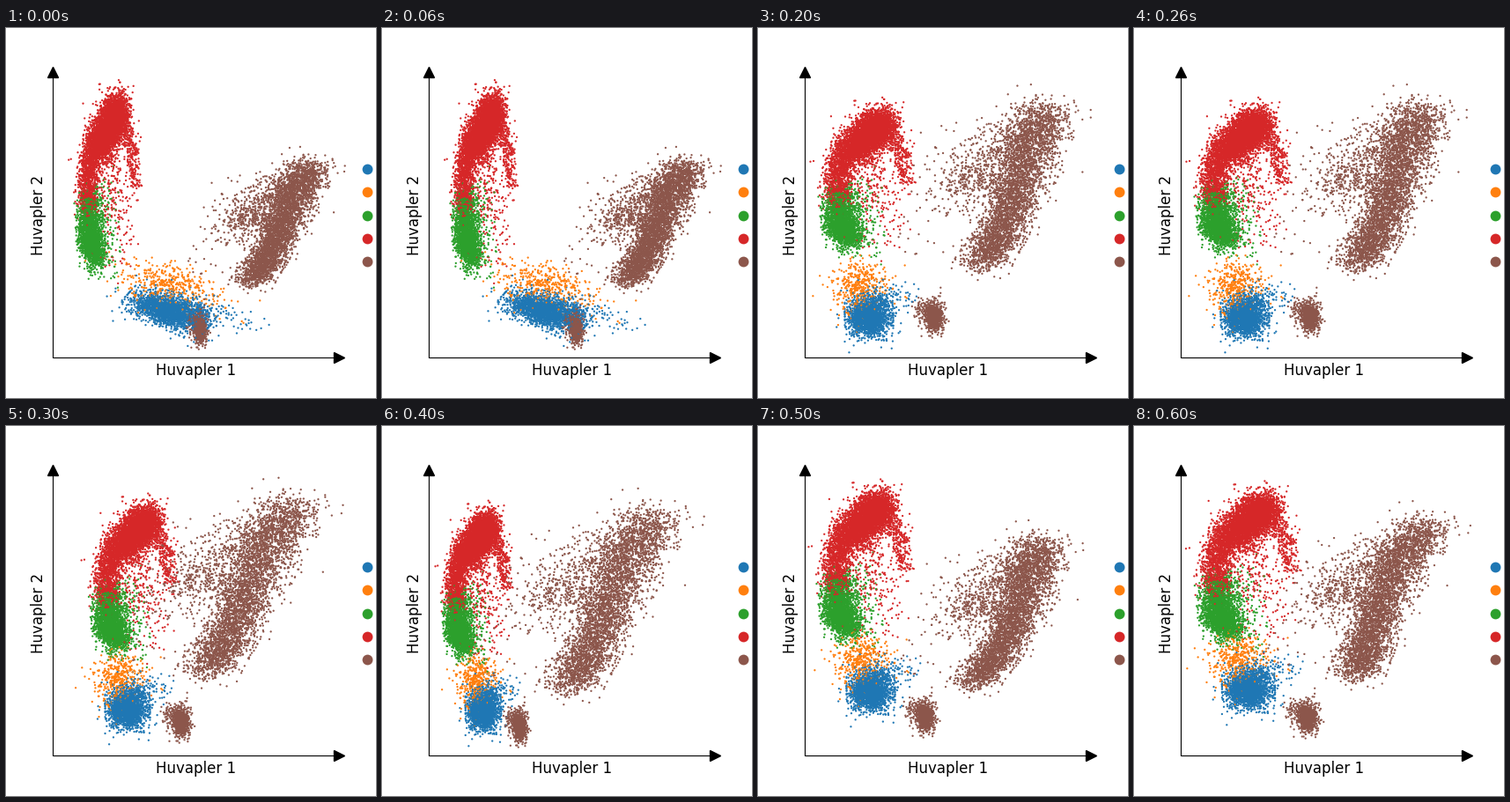
Recreate the animation shown at these times as a matplotlib script. Size 420x420 px, loop 0.7 s.

```python
import numpy as np
import matplotlib.pyplot as plt
from matplotlib.animation import FuncAnimation

SIZE, DPI = 420, 100
BLUE, ORANGE, GREEN, RED, BROWN = "#1f77b4", "#ff7f0e", "#2ca02c", "#d62728", "#8c564b"

# Key points per step: box of the arch (x, y, width, height), centres of the
# base and the island, top and foot of the large mass, and its bow.
ARCH = np.array([(82, 68, 66, 210), (74, 80, 113, 165), (75, 86, 95, 169),
                 (100, 84, 88, 176), (72, 92, 70, 173), (73, 68, 95, 178),
                 (76, 70, 104, 178)])
BASE = np.array([(184, 321), (130, 320), (126, 328), (138, 321),
                 (115, 323), (128, 301), (130, 299)])
ISLAND = np.array([(219, 338), (225, 314), (198, 325), (197, 333),
                   (155, 338), (188, 327), (195, 328)])
TOP = np.array([(340, 158), (328, 95), (320, 95), (318, 92),
                (300, 105), (315, 135), (325, 115)])
FOOT = np.array([(280, 286), (272, 250), (255, 266), (230, 276),
                 (214, 294), (246, 290), (253, 280)])
BOW = [.02, .15, .03, 0, 0, .07, -.05]
STEPS = len(BOW)
TILT = np.array([(1.7, .65), (-.6, .65)])  # the base lies slanted at first

rng = np.random.default_rng(12)


def on_arch(p, k):
    return ARCH[k, :2] + p * ARCH[k, 2:]


def width(k):
    return np.diag([ARCH[k, 2] / 95, 1])


def on_base(p, k):
    return BASE[k] + p @ (TILT if k == 0 else width(k))


def on_island(p, k):
    return ISLAND[k] + p @ width(k)


def on_mass(p, k):
    """First coordinate runs sideways, second from top to foot."""
    axis = FOOT[k] - TOP[k]
    a, b = p.T
    c = np.clip(b, 0, 1)
    side = (a + BOW[k] * 4 * c * (1 - c)) * np.hypot(*axis)
    return TOP[k] + np.outer(b, axis) + np.outer(side, (1, 0))


def cloud(n, start, mid, end, spread, skew=1.0, tail=.05):
    """Points strewn with normal noise along a curve through three points."""
    t = rng.random((n, 1)) ** skew
    spine = ((1 - t) * (1 - 2 * t) * np.array(start)
             + 4 * t * (1 - t) * np.array(mid)
             + t * (2 * t - 1) * np.array(end))
    noise = np.clip(rng.normal(size=(n, 2)), -2.5, 2.5)
    noise *= np.where(rng.random((n, 1)) < tail, 1.6, 1)
    return spine + noise * spread


GROUPS = [
    # red head, limb, arm and strays
    (RED, on_arch, cloud(3500, (.72, .13), (.56, .19), (.37, .31), (.10, .058))),
    (RED, on_arch, cloud(1500, (.34, .26), (.20, .43), (.16, .66), (.085, .05))),
    (RED, on_arch, cloud(260, (.80, .22), (.94, .36), (.95, .55), (.055, .04))),
    (RED, on_arch, cloud(260, (.50, .35), (.57, .58), (.65, .92), (.16, .08), 1.4)),
    # green body and strays
    (GREEN, on_arch, cloud(2300, (.21, .62), (.19, .79), (.33, .91), (.09, .045), .9)),
    (GREEN, on_arch, cloud(200, (.36, .56), (.40, .75), (.48, .92), (.13, .07))),
    # orange and blue base
    (ORANGE, on_base, cloud(430, (-6, -52), (-11, -32), (-15, -14), (13, 10), tail=.15)),
    (BLUE, on_base, cloud(2000, (0, -5), (0, 0), (0, 5), (11, 10))),
    (BLUE, on_base, cloud(120, (-5, -30), (18, -18), (40, -25), (10, 9))),
    # brown island
    (BROWN, on_island, cloud(800, (-18, -8), (0, 0), (4, 5), (4.5, 8), .55)),
    # brown mass: upper part, lower part, left fuzz, strays
    (BROWN, on_mass, cloud(1700, (.02, .02), (0, .23), (0, .48), (.095, .07))),
    (BROWN, on_mass, cloud(2100, (0, .45), (.02, .74), (0, 1), (.075, .045), .9)),
    (BROWN, on_mass, cloud(600, (-.1, .1), (-.22, .36), (-.40, .48), (.10, .10))),
    (BROWN, on_mass, cloud(50, (-.45, .1), (-.5, .45), (-.45, .85), (.12, .1))),
]

hues = np.concatenate([[color] * len(p) for color, _, p in GROUPS])
cells = np.array([np.concatenate([place(p, k) for _, place, p in GROUPS])
                  for k in range(STEPS)])
order = rng.permutation(len(hues))
hues, cells = hues[order], cells[:, order]

fig = plt.figure(figsize=(SIZE / DPI, SIZE / DPI), dpi=DPI, facecolor="white")
ax = fig.add_axes([0, 0, 1, 1])
ax.set(xlim=(0, SIZE), ylim=(SIZE, 0))
ax.axis("off")

dots = ax.scatter(*cells[0].T, s=2.7, c=hues, linewidths=0)

# axes with arrow heads
ax.plot([53, 53, 378], [50, 374, 374], color="black", lw=.8)
ax.plot(53, 50, "^k", ms=8)
ax.plot(378, 374, ">k", ms=8)

label = dict(fontsize=12, family="DejaVu Sans", ha="center", va="baseline",
             rotation_mode="anchor")
ax.text(215.5, 394, "Huvapler 1", **label)
ax.text(42, 212, "Huvapler 2", rotation=90, **label)

# legend keys
for i, color in enumerate((BLUE, ORANGE, GREEN, RED, BROWN)):
    ax.plot(410, 160 + 26.3 * i, "o", color=color, ms=8.5, mew=0)


def update(step):
    dots.set_offsets(cells[step % STEPS])
    return dots,


anim = FuncAnimation(fig, update, frames=STEPS, interval=100, repeat=True)
plt.show()
```
